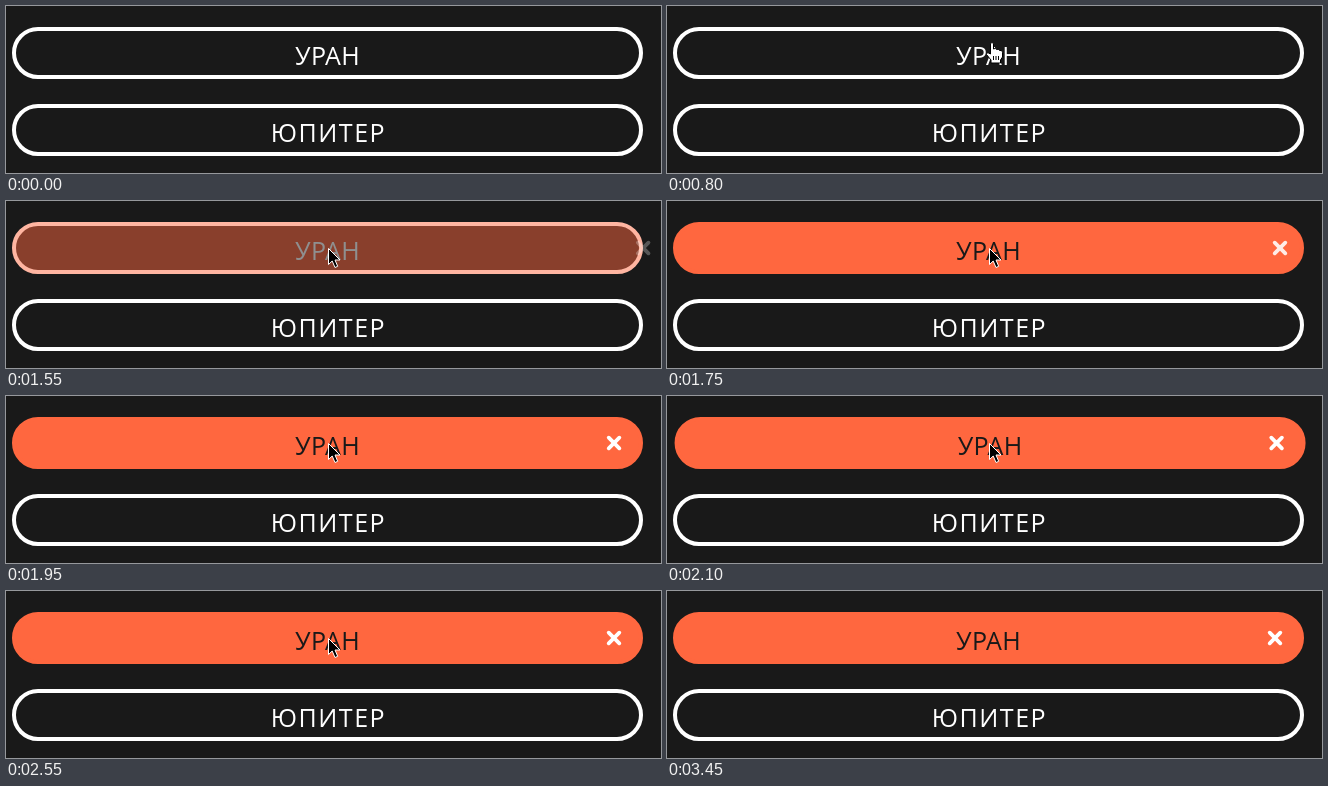
Write an HTML page that moves like this. It is 655 px wide and 167 px high and loops after 4200 ms.

```html
<!DOCTYPE html>
<html lang="ru">
<head>
<meta charset="utf-8">
<style>
  html, body { margin: 0; width: 100%; height: 100%; overflow: hidden; background: #191919; }
  svg { display: block; }
  rect { fill: none; stroke: #fff; stroke-width: 4; }
  text { font: 25px "Open Sans", "Noto Sans", sans-serif; fill: #fff; text-anchor: middle; }
  #cross { stroke: #fff; stroke-width: 3.8; stroke-linecap: round; }
</style>
</head>
<body>
<svg width="655" height="167" viewBox="0 0 655 167">
  <g id="answer">
    <rect id="pill" x="8" y="23" width="627" height="48" rx="24"/>
    <text id="label" x="321.5" y="59" letter-spacing=".3">УРАН</text>
    <path id="cross" d="M602.7 41.7l10.6 10.6m0-10.6l-10.6 10.6"/>
  </g>
  <rect x="8" y="100" width="627" height="48" rx="24"/>
  <text x="322.5" y="136" letter-spacing="1.5">ЮПИТЕР</text>
  <g id="cursor">
    <path id="arrow" d="M.5 .5V16.5L4.2 13L7 19.5L9.7 18.3L7 12H12Z" fill="#000" stroke="#fff"/>
    <g id="hand">
      <path d="M-1.5 1Q0-.5 1.5 1V7Q3.5 5.5 4.5 7.5Q6.5 6.5 7.5 8.5Q10.5 7.5 10.5 10.5V15L8.5 18V21H-1V18L-5.5 12Q-6-.0-1.5 12Z" fill="none"/>
      <path d="M-1.5 1.5Q0-.5 1.5 1.5V7Q3.5 5.5 4.5 7.5Q6.5 6.5 7.5 8.5Q10.5 7.5 10.5 10.5V15L8.5 18V21H-1V18L-5.5 12.5Q-5.5 9.5-1.5 12Z" fill="#fff" stroke="#000"/>
      <path d="M1.5 14v4M4 14v4M6.5 14v4" stroke="#000"/>
    </g>
  </g>
</svg>
<script>
const $ = id => document.getElementById(id);
const LOOP = 4200, STEP = 50;
const DARK = [25, 25, 25], WHITE = [255, 255, 255], ORANGE = [255, 103, 63];

// time, x, y of the pointer's hot spot
const path = [
  [400, 291, -24], [650, 300, 113], [800, 325, 36], [900, 325, 36],
  [950, 322, 40], [1050, 322, 47], [3250, 322, 47], [3450, 318, -24]
];

const part = (t, from, length) => Math.min(1, Math.max(0, (t - from) / length));
const easeOut = p => 1 - (1 - p) ** 3;
const mix = (a, b, p) => a + (b - a) * p;
const blend = (a, b, p) => `rgb(${a.map((v, i) => Math.round(mix(v, b[i], p)))})`;
const move = (el, x, y) => el.setAttribute("transform", `translate(${x} ${y})`);
const show = (el, on) => el.setAttribute("visibility", on ? "visible" : "hidden");

function shake(t) {
  const beat = part(t, 1550, 1000) * 5, n = Math.floor(beat), half = (beat - n) * 2;
  const push = half < 1 ? easeOut(half) : 1 - easeOut(half - 1);
  return 12.6 * push * (n % 2 ? -1 : 1);
}

function pointer(t) {
  const i = path.findIndex(p => p[0] > t);
  if (i < 1) return null;
  const [t0, x0, y0] = path[i - 1], [t1, x1, y1] = path[i];
  const p = part(t, t0, t1 - t0);
  return [mix(x0, x1, p), mix(y0, y1, p)];
}

function draw(t) {
  const fill = easeOut(part(t, 1500, 250)), slide = easeOut(part(t, 1500, 500));
  move($("answer"), shake(t), 0);
  $("pill").style.fill = blend(DARK, ORANGE, fill);
  $("pill").style.stroke = blend(WHITE, ORANGE, fill);
  $("label").style.fill = blend(WHITE, DARK, fill);
  move($("cross"), 40 * (1 - slide), 0);
  $("cross").style.opacity = slide;

  const at = pointer(t);
  if (at) move($("cursor"), ...at);
  const [, y] = at || [0, -1];
  const hand = t < 1100 && (y > 21 && y < 73 || y > 98);
  show($("arrow"), at && !hand);
  show($("hand"), at && hand);
}

const start = performance.now();
function tick() {
  const t = (performance.now() - start) % LOOP;
  draw(Math.floor(t / STEP) * STEP);
  requestAnimationFrame(tick);
}
tick();
</script>
</body>
</html>
```
